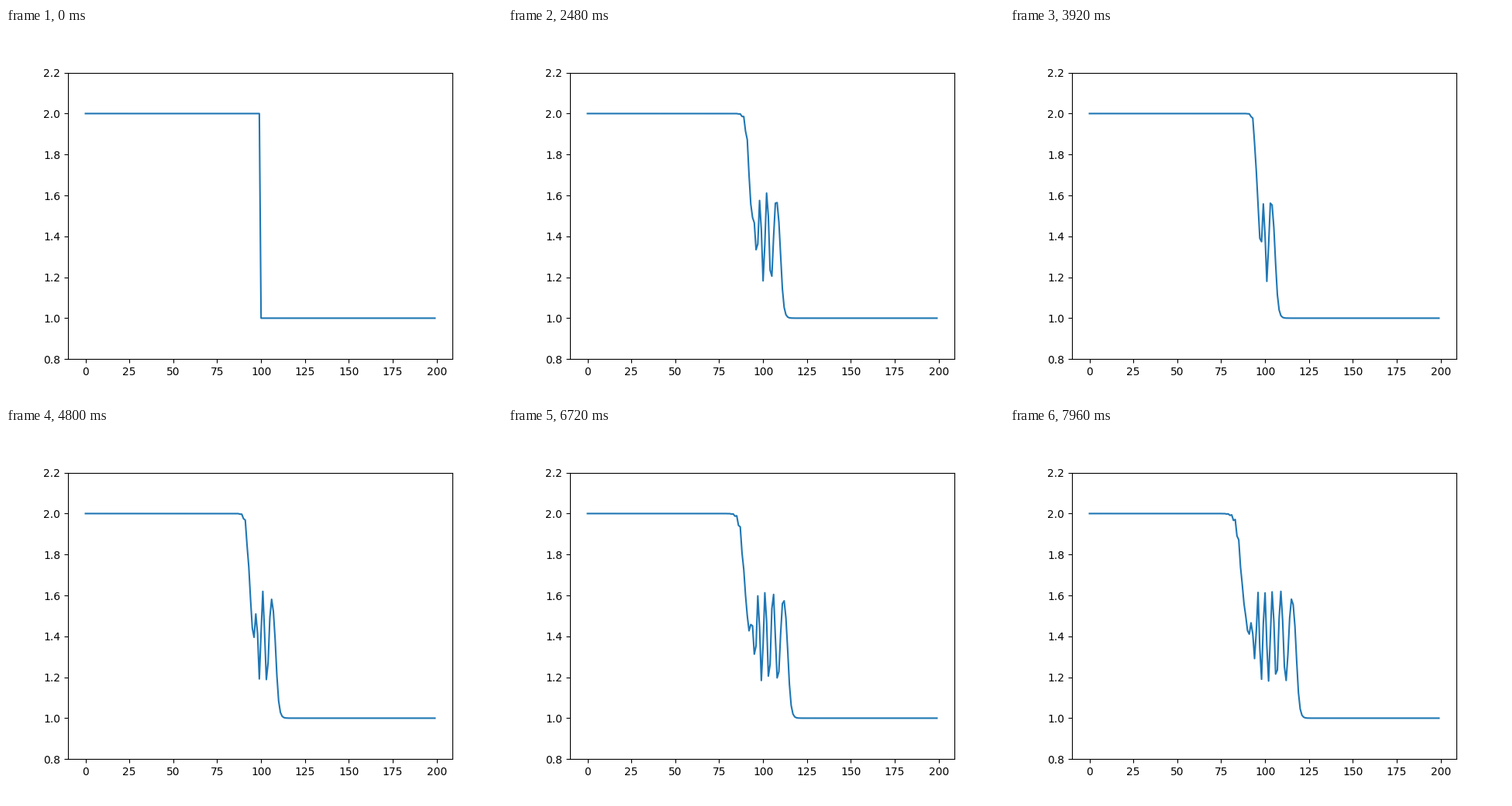
These frames come from a looping animation (640x480 px, 8000 ms). A matplotlib script:

```python
import numpy as np
import matplotlib.pyplot as plt
from matplotlib.animation import FuncAnimation

FRAMES = 200
x = np.arange(200)


def step_up(u):
    """Smooth rise from 0 to 1."""
    return 0.5 * (1 + np.tanh(u / 2))


def run_time(i):
    """Three runs, each starting again from the sharp step; the second is quicker."""
    if i < 33:
        return max(i - 1, 0)
    if i < 66:
        return np.interp(i, [33, 39, 65], [0, 6, 75])
    return i - 66


def profile(i):
    t = run_time(i)
    spread = 1 - np.exp(-t / 8)

    # positions and widths of the two fronts moving apart
    right = 99.5 + 0.119 * t + 2.5 * spread
    left = 99.5 - 0.084 * t - 1.8 * spread
    right_width = 0.05 + 0.8 * spread
    left_width = 0.05 + 0.5 * spread + 0.0065 * t

    # left fan, with even cells running ahead of odd ones
    fan = step_up((x - left) / left_width)
    ahead = np.where(x % 2 == 0, 0.5, -0.5) * (1 - fan) ** 4
    y = 2 - 0.6 * fan * (1 + ahead)

    # ripples trailing the right front, shorter towards the left
    length = max(0.159 * t - 1.3, 1)
    crest = right - 2
    s = np.maximum(crest - x, 0) / length
    ripple = np.cos(2 * np.pi * length / 5 * s ** 1.3)
    fade = np.exp(-np.maximum(crest - length - x, 0) / 3)
    y = y + 0.22 * ripple * fade * fan ** 3

    return 1 + (y - 1) * step_up((right - x) / right_width)


fig, ax = plt.subplots(figsize=(6.4, 4.8), dpi=100)
line, = ax.plot(x, profile(0))
ax.set_ylim(0.8, 2.2)


def update(i):
    line.set_ydata(profile(i))
    return line,


anim = FuncAnimation(fig, update, frames=FRAMES, interval=40,
                     repeat=True, repeat_delay=0)
plt.show()
```
